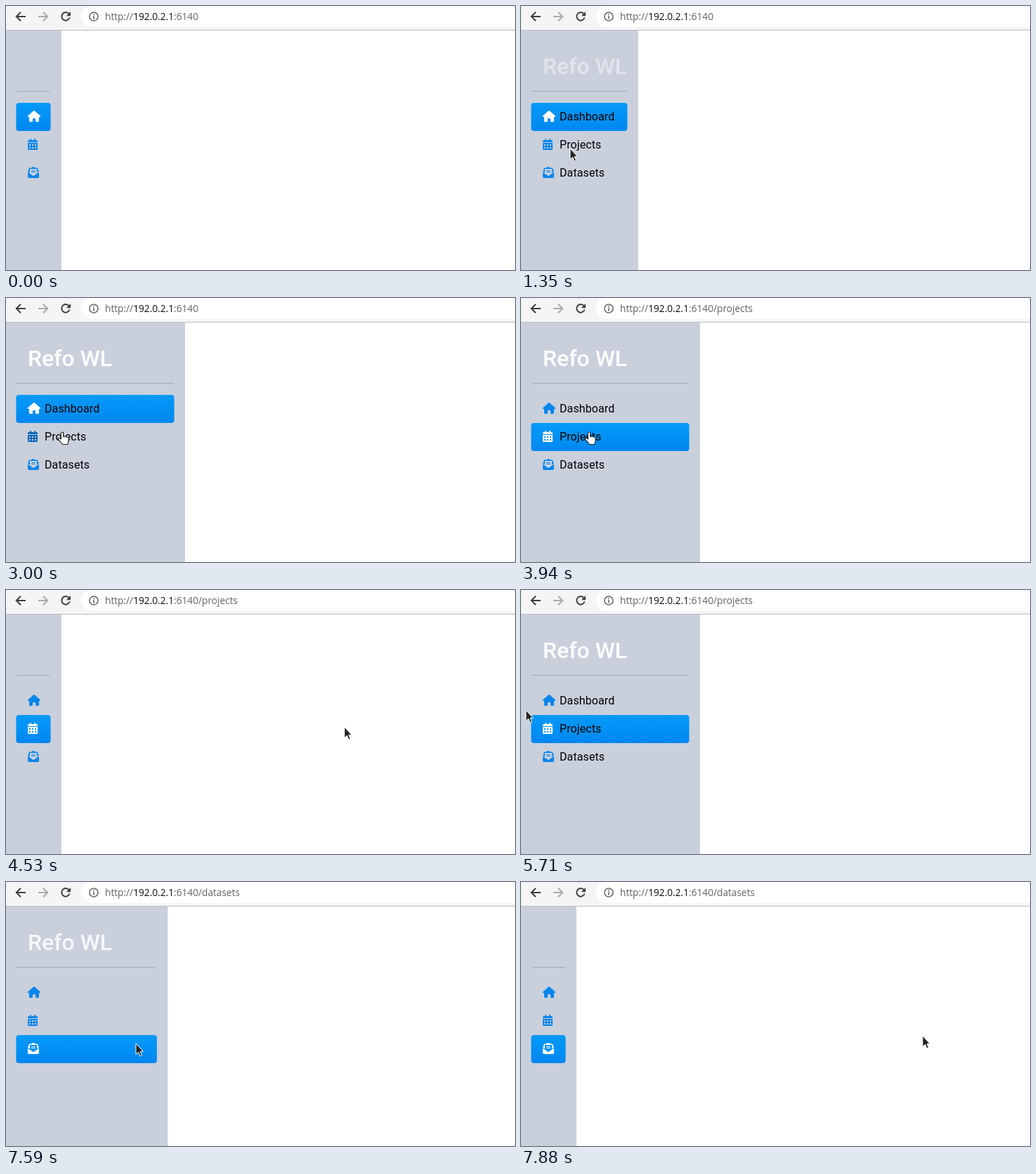
Animation, 725 px wide and 376 px high, one loop 8 s. Source, as an HTML page:

```html
<!DOCTYPE html>
<html lang="en">
<head>
<meta charset="utf-8">
<title>Collapsible sidebar</title>
<style>
  html, body { margin: 0; width: 100%; height: 100%; overflow: hidden; background: #fff; }
  svg { display: block; width: 725px; height: 376px; }
  .url { font: 13.7px "Open Sans", "Noto Sans", sans-serif; fill: #5f6368; }
  .url .host { fill: #0c0d0e; }
  .title { font: 500 32px Roboto, sans-serif; fill: #fff; }
  .label { font: 16px Roboto, sans-serif; letter-spacing: .1px; fill: #000; }
  .line { fill: none; stroke: #3c3f42; stroke-width: 2; }
</style>
</head>
<body>
<svg viewBox="0 0 725 376">
  <defs>
    <linearGradient id="blue" x2="0" y2="1">
      <stop stop-color="#049af8"/>
      <stop offset="1" stop-color="#0087f0"/>
    </linearGradient>
    <clipPath id="clip"><rect id="clipBox" y="35" height="341"/></clipPath>
  </defs>

  <rect width="725" height="376" fill="#fff"/>
  <rect width="725" height="34" fill="#f5f5f5"/>
  <rect x="107" width="660" height="30" rx="15" fill="#fff"/>
  <rect y="34" width="725" height="1" fill="#bdbebf"/>
  <path class="line" d="M28 15H15.5M21 8.7L14.7 15L21 21.3"/>
  <path class="line" style="stroke:#a9abad" d="M46 15H58.5M53 8.7L59.3 15L53 21.3"/>
  <path class="line" d="M89.6 11.2A5.8 5.8 0 1 0 90.6 16.5"/>
  <path fill="#3c3f42" d="M92 8V14.2H85.8Z"/>
  <circle class="line" cx="125" cy="15" r="6.1" style="stroke-width:1.5;stroke:#5f6368"/>
  <path fill="#5f6368" d="M124.2 14h1.6v4.5h-1.6zM124.2 11.3h1.6v1.6h-1.6z"/>
  <text class="url" x="141" y="20">http://<tspan class="host">192.0.2.1</tspan>:6140<tspan id="path"></tspan></text>

  <rect id="side" y="35" height="341" fill="#c9d0dc"/>
  <g clip-path="url(#clip)">
    <text id="title" class="title" x="31" y="97">Refo WL</text>
  </g>
  <rect id="rule" x="15" y="121" height="1" fill="#a5abb6"/>
  <g id="nav"></g>

  <path id="arrow" d="M0 0V15.6L3.6 12.3L6.2 18L8.6 16.9L6.1 11.4H10.4Z"
    fill="#222" stroke="#fff" stroke-linejoin="round"/>
  <path id="hand" d="M-1.6 10V1.6a1.6 1.6 0 0 1 3.2 0V6.6c.7-.8 2.2-.8 2.7.2c.8-.8 2.1-.6 2.5.4c1-.4 2.2.1 2.2 1.5V12.5c0 2-1 2.7-1.1 5H.2C0 15.5-3 13.4-5.6 10.2c-.8-1.5 1.1-2.5 2.2-1.4Z"
    fill="#fff" stroke="#222" stroke-width="1.1" stroke-linejoin="round"/>
</svg>

<script>
const LOOP = 8000, FPS = 17;
const SLIDE = 120, FADE = 150;
const LINK = [8, 134, 236], DARK = [5, 100, 180], WHITE = [255, 255, 255];

const hovers = [{ enter: 1293, leave: 4010 }, { enter: 5420, leave: 7560 }];
const clicks = [3196, 7015];
const appears = 1170;
const entry = [575, 222];
const moves = [
  { from: 1180, to: 1350, at: [70, 203] },
  { from: 1355, to: 1410, at: [74, 146] },
  { from: 1700, to: 1765, at: [2, 149] },
  { from: 1765, to: 1880, at: [49, 150] },
  { from: 2060, to: 2115, at: [77, 149] },
  { from: 2480, to: 2720, at: [102, 158] },
  { from: 2720, to: 3000, at: [80, 191] },
  { from: 3900, to: 4235, at: [482, 195] },
  { from: 4840, to: 5470, at: [7, 171] },
  { from: 5720, to: 6350, at: [89, 233] },
  { from: 6540, to: 6588, at: [77, 233] },
  { from: 7540, to: 7700, at: [572, 219] }
];

// Rounded squares of the calendar grid
const dots = [2, 6, 10].map(x => [8, 12].map(y => `M${x} ${y}v2h2v-2Z`).join('')).join('');
const textLines = [5, 7].map(y => `M5.5 ${y}h5a.5.5 0 0 1 0 1h-5a.5.5 0 0 1 0-1Z`).join('');

const items = [
  { label: 'Dashboard', icon: 'M18 8a1 1 0 0 1-1 1H16V14.75A1.25 1.25 0 0 1 14.75 16H12.25A1.25 1.25 0 0 1 11 14.75V12a1 1 0 0 0-1-1H8a1 1 0 0 0-1 1V14.75A1.25 1.25 0 0 1 5.75 16H3.25A1.25 1.25 0 0 1 2 14.75V9H1A1 1 0 0 1 .3 7.2L8.3 .25a1.05 1.05 0 0 1 1.4 0L17.7 7.2A1 1 0 0 1 18 8Z' },
  { label: 'Projects', icon: 'M3 1a1 1 0 0 1 2 0V2H9V1a1 1 0 0 1 2 0V2h1.5A1.5 1.5 0 0 1 14 3.5V5H0V3.5A1.5 1.5 0 0 1 1.5 2H3ZM0 6H14V14.5A1.5 1.5 0 0 1 12.5 16H1.5A1.5 1.5 0 0 1 0 14.5Z' + dots },
  { label: 'Datasets', icon: 'M3 3V8.5L0 6.3A2 2 0 0 1 .8 4.9L1.5 4.4V3A1.5 1.5 0 0 1 3 1.5H5.4L7 .35a1.7 1.7 0 0 1 2 0L10.6 1.5H13A1.5 1.5 0 0 1 14.5 3V4.4L15.2 4.9A2 2 0 0 1 16 6.3L13 8.5V3ZM0 7.6L6.8 12.6a2 2 0 0 0 2.4 0L16 7.6V14a2 2 0 0 1-2 2H2a2 2 0 0 1-2-2Z' + textLines }
];

const $ = id => document.getElementById(id);
const set = (el, attrs) => { for (const k in attrs) el.setAttribute(k, attrs[k]); };
const make = (tag, attrs, parent) => {
  const el = document.createElementNS('http://www.w3.org/2000/svg', tag);
  set(el, attrs);
  return parent.appendChild(el);
};
const lerp = (a, b, k) => a.map((v, i) => Math.round(v + (b[i] - v) * k));
const shown = on => on ? 'visible' : 'hidden';

// Eased progress from 0 to 1
function ease(t, start, length) {
  const x = Math.min(1, Math.max(0, (t - start) / length));
  return x * x * (3 - 2 * x);
}

const cursorAt = t =>
  moves.reduce((pos, m) => lerp(pos, m.at, ease(t, m.from, m.to - m.from)), entry);

const openness = t =>
  hovers.reduce((sum, h) => sum + ease(t, h.enter, SLIDE) - ease(t, h.leave, SLIDE), 0);

// Each click fades one item out and the next one in
function activeness(i, t) {
  const fadeIn = i ? ease(t, clicks[i - 1], FADE) : 1;
  const fadeOut = i < clicks.length ? ease(t, clicks[i], FADE) : 0;
  return fadeIn - fadeOut;
}

items.forEach((item, i) => {
  const y = item.y = 138 + 40 * i;
  item.pill = make('rect', { x: 14.4, y, height: 40, rx: 4 }, $('nav'));
  item.mark = make('path', { d: item.icon, 'fill-rule': 'evenodd', transform: `translate(31 ${y + 11})` }, $('nav'));
  item.text = make('text', { class: 'label', x: 55, y: y + 25 }, $('nav'));
  item.text.textContent = item.label;
});

function draw(t) {
  const [x, y] = cursorAt(t);
  const open = openness(t);
  const width = 79 + 176 * open;
  const hovered = hovers.some(h => t >= h.enter && t < h.leave);
  const page = clicks.filter(c => t >= c).length;

  $('path').textContent = page ? '/' + items[page].label.toLowerCase() : '';
  set($('side'), { width });
  set($('clipBox'), { width: width - 15 });
  set($('title'), { opacity: Math.max(0, (open - .1) / .9) });
  set($('rule'), { width: width - 31 });

  let pointing = false;
  items.forEach((item, i) => {
    const level = activeness(i, t);
    const over = hovered && open > .6 && x > 15 && x < width - 16 && y >= item.y && y < item.y + 40;
    pointing = pointing || over;
    set(item.pill, { width: width - 29.8, opacity: level, fill: i === page ? 'url(#blue)' : '#028ff1' });
    set(item.mark, { fill: `rgb(${lerp(over ? DARK : LINK, WHITE, level)})` });
    set(item.text, { visibility: shown(hovered) });
  });

  const transform = `translate(${x} ${y})`;
  set($('arrow'), { transform, visibility: shown(t >= appears && !pointing) });
  set($('hand'), { transform, visibility: shown(pointing) });
}

// The picture advances in whole ticks, like a screen recording
const start = performance.now();
function frame(now) {
  const ms = Math.max(0, now - start) % LOOP;
  draw(Math.floor(ms * FPS / 1000 + .1) * 1000 / FPS);
  requestAnimationFrame(frame);
}
draw(0);
requestAnimationFrame(frame);
</script>
</body>
</html>
```
